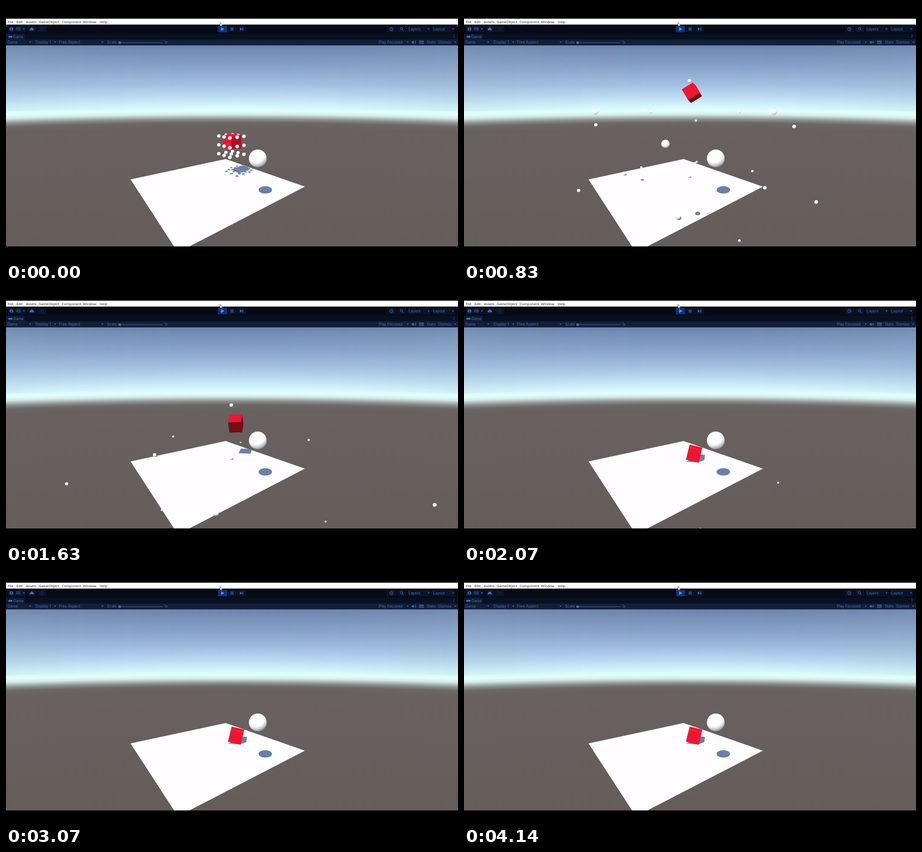
An HTML page with a canvas that plays this animation: 998x561 px, repeating every 4180 ms.

```html
<!DOCTYPE html>
<html lang="en">
<head>
<meta charset="utf-8">
<title>Physics burst</title>
<style>
html, body { margin: 0; width: 100%; height: 100%; overflow: hidden; background: #000 }
canvas { display: block }
</style>
</head>
<body>
<canvas id="stage" width="998" height="561"></canvas>
<script>
const g = stage.getContext('2d');
const LOOP = 4180, TAU = Math.PI * 2;
const BLUE = '#416fb9', SHADE = '#6b7fa8';
const lerp = (a, b, k) => a + (b - a) * k;

// World: x right, y down from eye level (floor at 1), z away from the camera
const FOCAL = 384, EYE = [499, 234], CENTER = { x: -.01, y: .507, z: 2.65 };
const LIGHT = { x: .3, y: 1, z: .72 };
const GRAVITY = 1.12, BLAST = 1.95, GAP = .135, BALL = .0276;
const TURN = Math.PI / 4 + .1;
const sphere = { x: .277, y: .5, z: 1.87, r: .0955 };
const PLANE = [[275, 383], [485, 338], [660, 399], [405, 531], [371, 531]];

// Cube tumble: time, yaw, pitch, roll in degrees
const TUMBLE = [
  [0, -40, 7, -6], [.53, 0, 0, -18], [1.17, 30, -29, -51], [1.63, 10, -54, -93], [2.05, -45, -71, -43]
];

function project({ x, y, z }) {
  return [EYE[0] + FOCAL * x / z, EYE[1] + FOCAL * y / z];
}
function castShadow({ x, y, z }) {
  const h = 1 - y;
  return { x: x + LIGHT.x * h, y: 1, z: z + LIGHT.z * h };
}

function poly(points, fill) {
  g.beginPath();
  points.forEach(p => g.lineTo(...p));
  g.closePath();
  g.fillStyle = fill;
  g.fill();
}
function oval(x, y, rx, ry, fill) {
  g.beginPath();
  g.ellipse(x, y, rx, ry, 0, 0, TAU);
  g.fillStyle = fill;
  g.fill();
}
function box(x, y, w, h, fill) {
  g.fillStyle = fill;
  g.fillRect(x, y, w, h);
}
function gradient(fill, stops) {
  stops.forEach(([at, color]) => fill.addColorStop(at, color));
  return fill;
}

function makeBackdrop() {
  const layer = document.createElement('canvas');
  layer.width = 998;
  layer.height = 561;
  const c = layer.getContext('2d');
  const sky = gradient(c.createLinearGradient(0, 88, 0, 531), [
    [0, '#6c85ae'], [.1, '#86a0c8'], [.19, '#a2bee0'], [.25, '#bbdaf1'],
    [.295, '#d2f3fb'], [.325, '#e2fffb'], [.342, '#d3ebe8'], [.365, '#8d9190'],
    [.383, '#6c6765'], [.41, '#686160'], [1, '#645d59']
  ]);
  // Stretching each column bends the horizon
  for (let x = 0; x < 998; x++) {
    const bend = ((x - 499) / 499) ** 2, scale = 1 + .058 * bend;
    c.setTransform(1, 0, 0, scale, x, 88 * (1 - scale));
    c.fillStyle = sky;
    c.fillRect(0, 80, 1, 460);
    c.fillStyle = `rgba(160,195,195,${.13 * bend})`;
    c.fillRect(0, 80, 1, 145);
  }
  return layer;
}
const backdrop = makeBackdrop();

// Every ball starts in a 3×3×3 grid and is blown straight away from its centre
function ballAt(i, j, k, t) {
  let reach = GAP + BLAST / Math.hypot(i, j, k) * t;
  let y = CENTER.y - k * reach + GRAVITY * t * t;
  const lands = k < 0 && !i === !j;
  if (lands) {
    // Roll with friction until the edge of the floor, then drop
    const range = .78, drag = 1.75, edge = j > 0 ? .58 : .875;
    const leave = -Math.log(1 - (edge - GAP) / range) / drag;
    const fall = i ? Math.max(0, t - leave) : 0, s = t - fall;
    reach = GAP + range * (1 - Math.exp(-drag * s)) + range * drag * Math.exp(-drag * s) * fall;
    y = Math.min(1 - BALL, y) + GRAVITY * fall * fall;
  }
  const u = i * reach, v = j * reach, c = Math.cos(TURN), s = Math.sin(TURN);
  return { x: CENTER.x + u * c + v * s, y, z: CENTER.z - u * s + v * c, r: BALL };
}

function ballsAt(t) {
  const balls = [], steps = [-1, 0, 1];
  for (const i of steps) for (const j of steps) for (const k of steps)
    if (i || j || k) balls.push(ballAt(i, j, k, t));
  return balls.filter(b => b.z > .35);
}

function drawBall(b) {
  const [x, y] = project(b), r = b.r * FOCAL / b.z;
  oval(x, y, r, r, gradient(
    g.createRadialGradient(x - r * .2, y - r * .5, 0, x - r * .2, y - r * .5, r * 1.53),
    [[0, '#fff'], [.62, '#fdfdfd'], [.8, '#d0d5d9'], [1, '#868d94']]));
}

function drawBallShadow(b) {
  if (b.y > 1) return;
  const spot = castShadow(b), [x, y] = project(spot), rx = b.r * .9 * FOCAL / spot.z;
  oval(x, y, rx, rx * 1.22 / spot.z, SHADE);
}

function cubeAt(t) {
  const y = CENTER.y - .052 - 1.83 * t + GRAVITY * t * t;
  return { x: .035 * Math.min(t, 1.8), y: t > 1.85 ? .91 : Math.min(.91, y), z: CENTER.z };
}

// Cube faces as a normal and four corner offsets
function cubeFaces(t) {
  let n = 0;
  while (n < 3 && t > TUMBLE[n + 1][0]) n++;
  const from = TUMBLE[n], to = TUMBLE[n + 1];
  const k = Math.min(1, (t - from[0]) / (to[0] - from[0]));
  const [yaw, pitch, roll] = [1, 2, 3].map(m => lerp(from[m], to[m], k) * Math.PI / 180);
  const spin = (a, b, angle) => [
    a * Math.cos(angle) - b * Math.sin(angle), a * Math.sin(angle) + b * Math.cos(angle)];
  const turn = ([x, y, z]) => {
    [x, y] = spin(x, y, roll);
    [y, z] = spin(y, z, pitch);
    [z, x] = spin(z, x, yaw);
    return { x, y, z };
  };
  const axes = [turn([1, 0, 0]), turn([0, 1, 0]), turn([0, 0, 1])];
  const mix = (a, b, c, p, q, s) => {
    const at = m => (a[m] * p + b[m] * q + c[m] * s) * .099;
    return { x: at('x'), y: at('y'), z: at('z') };
  };
  return axes.map((axis, m) => {
    const side = axis.z > 0 ? -1 : 1, b = axes[(m + 1) % 3], c = axes[(m + 2) % 3];
    return {
      normal: { x: axis.x * side, y: axis.y * side, z: axis.z * side },
      corners: [[-1, -1], [1, -1], [1, 1], [-1, 1]].map(([p, q]) => mix(axis, b, c, side, p, q))
    };
  });
}

function drawCube(cube, faces) {
  const [x, y] = project(cube), scale = FOCAL / cube.z;
  for (const { normal, corners } of faces) {
    const dot = -(normal.x * LIGHT.x + normal.y * LIGHT.y + normal.z * LIGHT.z) / 1.27;
    const lit = Math.max(0, Math.min(1, dot * 2.5));
    poly(corners.map(p => [x + p.x * scale, y + p.y * scale]),
      `rgb(${lerp(112, 240, lit)},${lerp(12, 22, lit)},${lerp(24, 48, lit)})`);
  }
}

function drawCubeShadow(cube, faces) {
  for (const { corners } of faces)
    poly(corners.map(p => project(castShadow(
      { x: cube.x + p.x, y: cube.y + p.y, z: cube.z + p.z }))), SHADE);
}

function scene(t) {
  const balls = ballsAt(t), cube = cubeAt(t), faces = cubeFaces(t);
  g.save();
  g.beginPath();
  g.rect(0, 87, 998, 444);
  g.clip();
  g.drawImage(backdrop, 0, 0);
  // Anything below floor level is hidden by the floor
  balls.filter(b => b.y > 1).forEach(drawBall);
  poly(PLANE, '#fffdff');
  g.save();
  g.clip();
  drawCubeShadow(cube, faces);
  [...balls, sphere].forEach(drawBallShadow);
  g.restore();
  [...balls.filter(b => b.y <= 1), sphere, cube].sort((a, b) => b.z - a.z)
    .forEach(item => item === cube ? drawCube(cube, faces) : drawBall(item));
  g.restore();
}

function label(x, y, text) {
  g.fillText(text, x, y);
}
function arrow(x, y) {
  poly([[x - 2.5, y - 1.2], [x + 2.5, y - 1.2], [x, y + 1.6]], BLUE);
}
function ring(x, y, r, color = BLUE) {
  g.beginPath();
  g.arc(x, y, r, 0, TAU);
  g.strokeStyle = color;
  g.stroke();
}
function line(...points) {
  g.beginPath();
  points.forEach(p => g.lineTo(...p));
  g.strokeStyle = BLUE;
  g.stroke();
}

function menuBar() {
  box(0, 28, 998, 13, '#fff');
  g.fillStyle = '#222';
  g.font = '7.8px "Open Sans", "Noto Sans", sans-serif';
  [[4, 'File'], [23, 'Edit'], [44, 'Assets'], [72, 'GameObject'],
   [123, 'Component'], [170, 'Window'], [207, 'Help']].forEach(([x, s]) => label(x, 37.5, s));
}

function toolbar() {
  box(0, 41, 998, 20, '#050a16');
  [[4, 40], [48, 18], [69, 20], [489, 20], [510, 20], [841, 20], [864, 20], [887, 51], [941, 50]]
    .forEach(([x, w]) => box(x, 44, w, 14, '#0a1429'));
  box(468, 44, 20, 14, '#12327c');
  poly([[475, 47], [482, 51], [475, 55]], '#5f96ed');
  box(496.5, 47.5, 1.8, 7, BLUE);
  box(500, 47.5, 1.8, 7, BLUE);
  poly([[516.5, 47.5], [521.5, 51], [516.5, 54.5]], BLUE);
  box(522, 47.5, 1.5, 7, BLUE);
  oval(12, 51, 4, 4, BLUE);
  oval(12, 49.8, 1.3, 1.3, '#0a1429');
  oval(12, 53, 2.2, 1.1, '#0a1429');
  oval(54.5, 52, 2.5, 2.1, BLUE);
  oval(57, 50.3, 2.9, 2.9, BLUE);
  oval(59.5, 52, 2.3, 2.1, BLUE);
  ring(79, 51, 3.5, '#152a50');
  ring(79, 51, 1.2, '#152a50');
  ring(851, 51, 3.7);
  line([851, 48.8], [851, 51.2], [853, 51.8]);
  ring(873, 50, 2.6);
  line([875, 52], [878, 55]);
  [39.5, 933, 987].forEach(x => arrow(x, 51));
  g.fillStyle = BLUE;
  label(22, 54, 'RB');
  label(889, 54, 'Layers');
  label(943, 54, 'Layout');
}

function gameBar() {
  box(0, 61, 998, 13, '#091020');
  box(0, 61, 42, 13, '#101a2f');
  box(0, 74, 998, 13, '#121f39');
  oval(7.5, 68, 2.5, 2.3, BLUE);
  oval(12, 68, 2.5, 2.3, BLUE);
  box(7.5, 66, 4.5, 3.2, BLUE);
  [64.8, 67, 69.2].forEach(y => oval(989, y, .8, .8, BLUE));
  [53.5, 108.5, 213, 887, 992].forEach(x => arrow(x, 80));
  line([251, 81], [345, 81]);
  oval(251, 81, 3, 3, BLUE);
  poly([[896, 78.5], [898, 78.5], [900.5, 76.5], [900.5, 83.5], [898, 81.8], [896, 81.8]], BLUE);
  line([902, 78], [903, 80], [902, 82]);
  line([904, 77], [905, 80], [904, 83]);
  g.strokeRect(913, 77, 8.5, 6);
  line([913, 79], [921.5, 79]);
  line([916, 77], [916, 83]);
  line([919, 77], [919, 83]);
  g.fillStyle = BLUE;
  label(16, 70.7, 'Game');
  [[3, 'Game'], [65, 'Display 1'], [117, 'Free Aspect'], [223, 'Scale'], [349, '1x'],
   [823, 'Play Focused'], [929, 'Stats'], [954, 'Gizmos']].forEach(([x, s]) => label(x, 83.3, s));
}

function cursor() {
  poly([[472.5, 36], [472.5, 45], [474.6, 43.2], [476, 46], [477.3, 45.3], [476, 42.7], [478.8, 42.4]], '#fff');
  g.strokeStyle = '#222';
  g.lineWidth = .8;
  g.stroke();
}

function draw() {
  const t = performance.now() % LOOP / 1000;
  box(0, 0, 998, 561, '#000');
  scene(t);
  g.lineWidth = 1;
  menuBar();
  g.font = '8.3px Inter, Roboto, sans-serif';
  toolbar();
  gameBar();
  cursor();
  requestAnimationFrame(draw);
}
draw();
</script>
</body>
</html>
```
